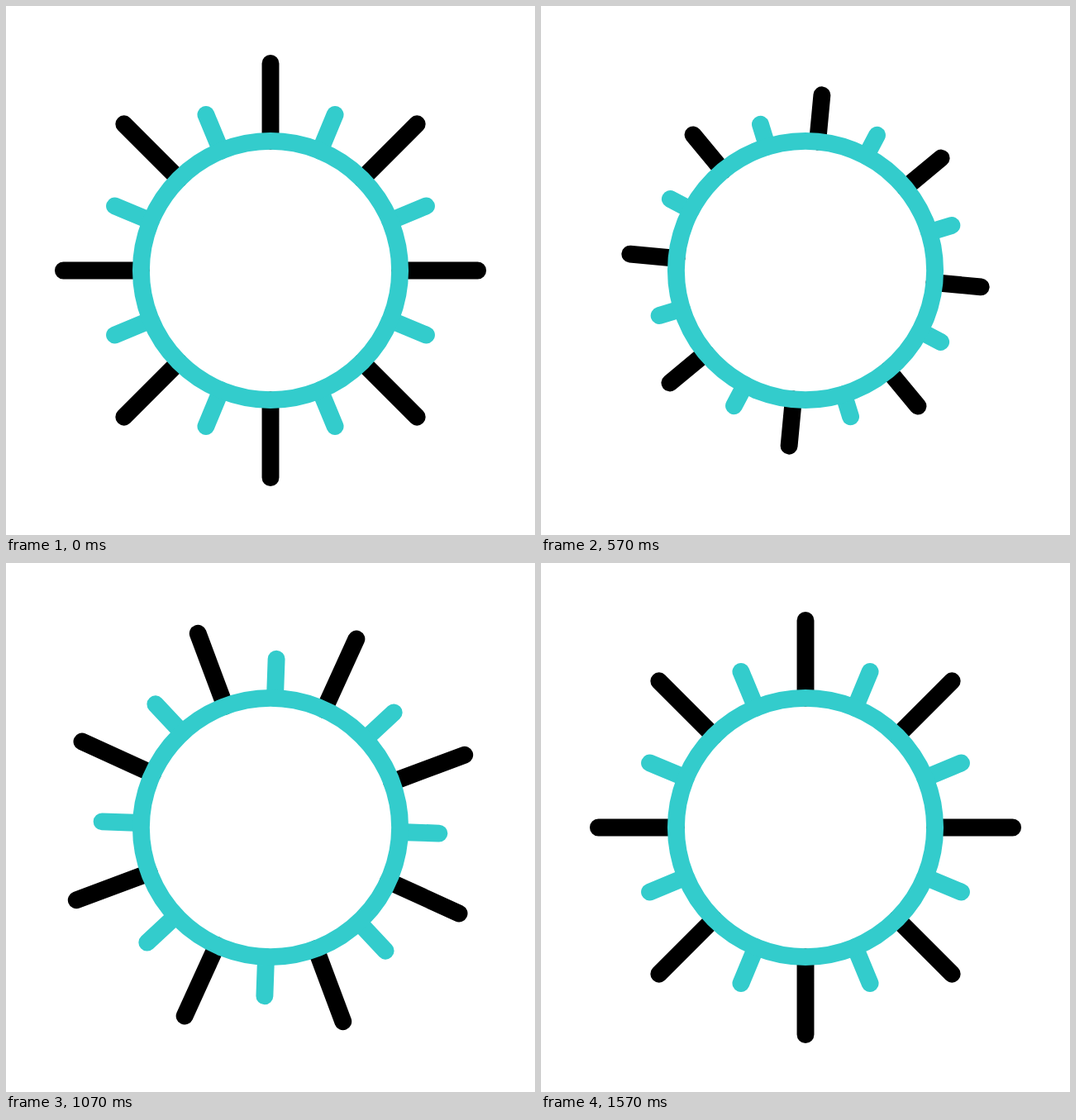
Animation of 640x640 px, one loop 1670 ms. Source, as an HTML page:

```html
<!DOCTYPE html>
<html lang="en">
<head>
<meta charset="utf-8">
<title>Sun</title>
<style>
  html, body { margin: 0; width: 100%; height: 100%; overflow: hidden; background: #fff; }
  svg { display: block; width: 100vw; height: 100vh; }
  path, circle { fill: none; stroke-width: 20.9; stroke-linecap: round; }
  .dark { stroke: #000; }
  .teal { stroke: #33cccc; }
</style>
</head>
<body>
<svg viewBox="-320 -320 640 640">
  <path id="long" class="dark"/>
  <path id="short" class="teal"/>
  <circle class="teal" r="156.6"/>
</svg>
<script>
  const LOOP = 1670, LAST = 47;
  const RING = 156.6, LONG = 250.6, SHORT = 204;

  // Steps: [tick, value, slope per tick], joined by cubic curves
  const TURN = [
    [0, 0, 0], [18, -40, 0], [23, -36.28, 1.2], [29, -27.14, 1.97],
    [35, -13.6, 2.15], [41, -3.27, 1.17], [46.5, 0, 0]
  ];
  const REACH = [[0, 1, 0], [11.5, 0.233, 0], [22.8, 1, 0]];

  function curve(steps, x) {
    const n = steps.findIndex(s => s[0] > x);
    if (n < 0) return steps[steps.length - 1][1];
    const [x0, y0, m0] = steps[n - 1], [x1, y1, m1] = steps[n];
    const w = x1 - x0, u = (x - x0) / w, v = 1 - u;
    return y0 * v * v * (1 + 2 * u) + y1 * u * u * (3 - 2 * u)
      + w * u * v * (m0 * v - m1 * u);
  }

  function rays(tip, offset) {
    let d = '';
    for (let i = 0; i < 8; i++) {
      const a = (i * 45 + offset) * Math.PI / 180;
      const at = r => (r * Math.sin(a)).toFixed(3) + ' ' + (-r * Math.cos(a)).toFixed(3);
      d += `M${at(RING)}L${at(tip)}`;
    }
    return d;
  }

  const longRays = document.getElementById('long');
  const shortRays = document.getElementById('short');
  const start = performance.now();

  function draw() {
    const t = (performance.now() - start) % LOOP;
    // 30 ticks a second, on a 10 ms clock
    const tick = Math.min(LAST, Math.floor((Math.floor(t / 10) + 0.5) * 0.3));
    const turn = curve(TURN, tick), reach = curve(REACH, tick);
    const tip = full => RING + (full - RING) * reach;
    longRays.setAttribute('d', rays(tip(LONG), turn));
    shortRays.setAttribute('d', rays(tip(SHORT), turn + 22.5));
    requestAnimationFrame(draw);
  }
  draw();
</script>
</body>
</html>
```
